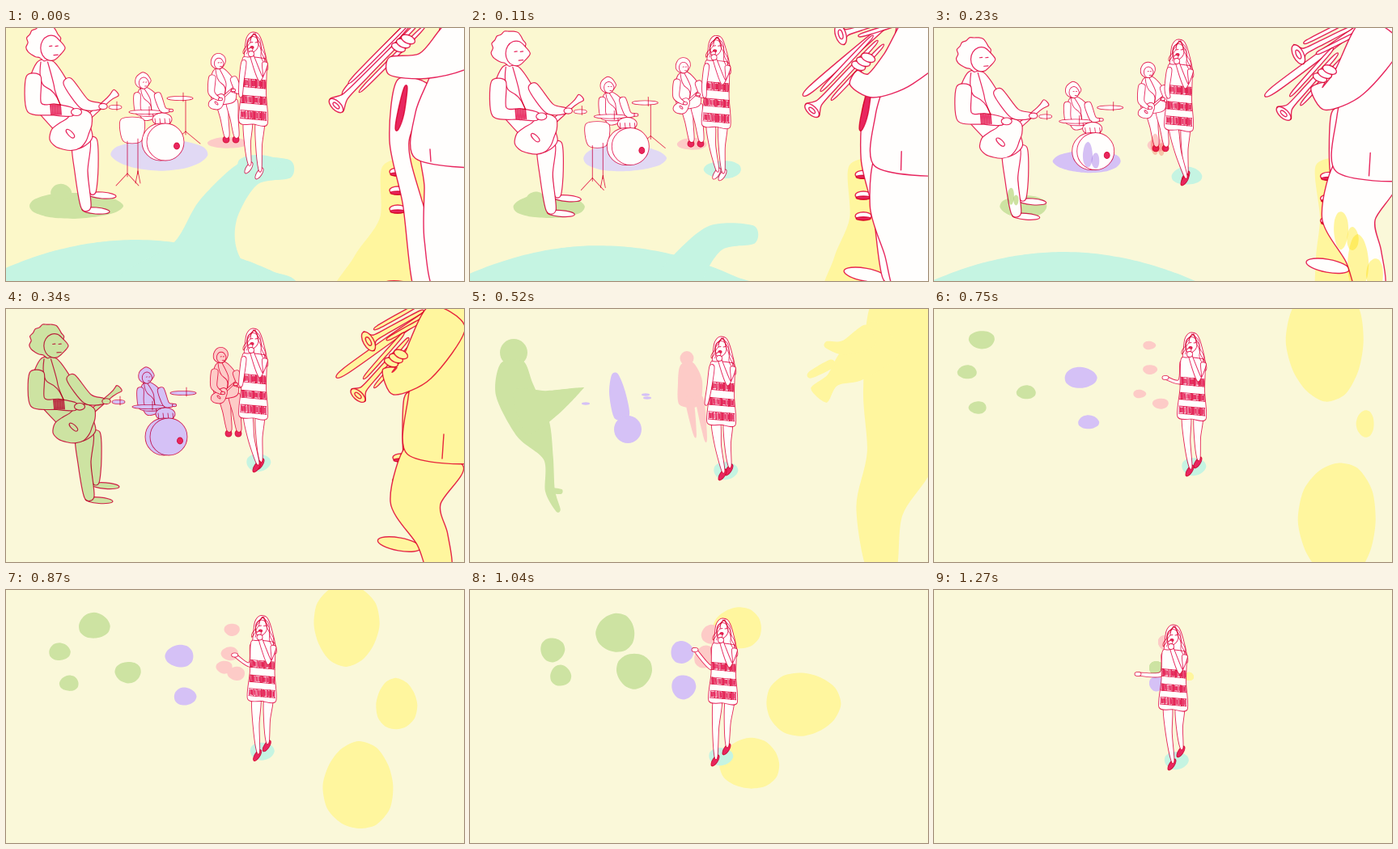
These frames come from a looping animation (566x313 px, 2.83 s). An HTML page with a canvas:

```html
<!DOCTYPE html>
<html lang="en">
<head>
<meta charset="utf-8">
<title>Band of colours</title>
<style>
html, body { margin: 0; width: 100%; height: 100%; overflow: hidden; background: #faf8d9; }
canvas { display: block; }
</style>
</head>
<body>
<canvas id="stage" width="566" height="313"></canvas>
<script>
const g = document.getElementById('stage').getContext('2d');
const LOOP = 2830;
const STEPS = [0, 50, 110, 230, 280, 340, 460, 520, 640, 700, 750, 870, 980, 1040, 1100, 1160, 1270];
const INK = '#e8265f', WHITE = '#fffefd';
const GREEN = '#cde3a2', PURPLE = '#d5c1f6', PINK = '#fdcbc7', YELLOW = '#fff69e', TEAL = '#c5f4e2';

const mix = (a, b, k) => a + (b - a) * k;
const mixPt = (p, q, k) => p.map((v, i) => mix(v, q[i], k));
const clamp = k => Math.max(0, Math.min(1, k));
const noise = i => { const v = Math.sin(i * 127.1 + 3.7) * 43758.5; return v - Math.floor(v); };
// Joints "x,y" or "x,y,half width".
const pts = s => s.split(' ').map(p => p.split(',').map(Number));

// Current fill and line weight; weight 0 draws plain colour.
let paint = WHITE, weight = 1;
function pen(color, w) { paint = color; weight = w; }

function ink(w = weight) {
  if (!w) return;
  g.globalCompositeOperation = 'multiply';
  g.strokeStyle = INK;
  g.lineWidth = w;
  g.stroke();
  g.globalCompositeOperation = 'source-over';
}
function fill(color = paint) {
  g.fillStyle = color;
  g.fill();
  ink();
}
function line(p, w = weight) {
  g.beginPath();
  p.forEach(([x, y], i) => {
    const [nx, ny] = p[i + 1] || [x, y];
    if (i && i < p.length - 1) g.quadraticCurveTo(x, y, (x + nx) / 2, (y + ny) / 2);
    else g.lineTo(x, y);
  });
  ink(w);
}
// Smooth closed outline.
function loop(p, color) {
  const n = p.length, at = i => p[(i + n) % n];
  g.beginPath();
  g.moveTo(p[0][0], p[0][1]);
  for (let i = 0; i < n; i++) {
    const [a, b, c, d] = [at(i - 1), at(i), at(i + 1), at(i + 2)];
    g.bezierCurveTo(b[0] + (c[0] - a[0]) / 7, b[1] + (c[1] - a[1]) / 7,
      c[0] - (d[0] - b[0]) / 7, c[1] - (d[1] - b[1]) / 7, c[0], c[1]);
  }
  g.closePath();
  fill(color);
}
function oval(x, y, rx, ry, color, tilt = 0) {
  g.beginPath();
  g.ellipse(x, y, rx, ry, tilt, 0, 7);
  fill(color);
}
// Closed shape whose radius is a function of the angle.
function polar(x, y, radius, n, squash = 1, tilt = 0, color) {
  const c = Math.cos(tilt), s = Math.sin(tilt);
  loop(Array.from({ length: n }, (_, i) => {
    const a = i / n * Math.PI * 2, r = radius(a, i), u = r * Math.cos(a), v = r * squash * Math.sin(a);
    return [x + u * c - v * s, y + u * s + v * c];
  }), color);
}
const blob = (x, y, rx, ry, color) => {
  if (rx < 0.5) return;
  pen(color, 0);
  polar(x, y, a => rx * (1 + 0.035 * Math.sin(a * 3 + rx)), 12, ry / rx);
};
// Tapered shape along joints.
function limb(joints, color) {
  const side = sign => joints.map(([x, y, w], i) => {
    const a = joints[Math.max(0, i - 1)], b = joints[Math.min(joints.length - 1, i + 1)];
    const d = Math.hypot(b[0] - a[0], b[1] - a[1]) || 1;
    return [x - (b[1] - a[1]) / d * w * sign, y + (b[0] - a[0]) / d * w * sign];
  });
  loop([...side(1), ...side(-1).reverse()], color);
}

function head(x, y, r, turn) {
  polar(x, y, (a, i) => r * (0.93 + 0.17 * noise(i + r)), r > 15 ? 24 : 12);
  const fx = x + r * 0.42 * turn, fy = y + r * 0.32;
  polar(fx, fy, (a, i) => r * (i ? 0.62 : 0.62 + 0.2 * turn), 10, 1.2);
  for (const e of [0.1, 0.45]) line([[fx + r * (e - 0.2), fy - r * 0.1], [fx + r * (e - 0.05), fy - r * 0.12]]);
  line([[fx + r * 0.15, fy + r * 0.42], [fx + r * 0.4, fy + r * 0.4]]);
}
function guitar([x, y], [tx, ty], r) {
  const a = Math.atan2(ty - y, tx - x);
  limb([[x, y, r * 0.12], [mix(x, tx, 0.82), mix(y, ty, 0.82), r * 0.1], [tx, ty, r * 0.18]]);
  polar(x, y, b => r * (1 + 0.14 * Math.cos(2 * b) + 0.12 * Math.cos(3 * b + 1)), 14, 0.86, a);
  oval(x - r * 0.1, y + r * 0.1, r * 0.26, r * 0.11, paint, 0.8);
}
function lapels([neck, chest, hip]) {
  for (const s of [-0.5, 0.35]) {
    line([[neck[0] + s * neck[2], neck[1]], [chest[0] + s * chest[2] * 0.9, chest[1] - chest[2] * 0.2],
      [chest[0] + chest[2] * 0.35, chest[1] + 4], [mix(chest[0], hip[0], 0.8), mix(chest[1], hip[1], 0.8)]]);
  }
}
function member({ face, torso, arms, legs = [], shoe, axe }) {
  for (const leg of legs) {
    const [x, y, w] = leg[leg.length - 1];
    oval(x + shoe.dx, y + shoe.ry, shoe.rx, shoe.ry, shoe.color, shoe.tilt);
    limb(leg);
  }
  limb(torso);
  lapels(torso);
  head(...face);
  if (axe) guitar(...axe);
  for (const arm of arms) {
    limb(arm);
    const [x, y, w] = arm[arm.length - 1];
    oval(x + w, y, w * 1.3, w * 0.9);
  }
}

const guitarist = {
  color: GREEN, move: [4, 22], squeeze: 0.95, top: 10, bottom: 245, width: 1.2,
  draw() {
    member({
      face: [47, 18, 21, 1],
      torso: pts('48,42,10 51,74,26 76,112,22 96,142,13'),
      legs: [pts('103,138,9 107,172,7 107,203,4'), pts('93,140,11 93,178,8 99,222,6')],
      shoe: { dx: 12, rx: 17, ry: 4, tilt: 0.08 },
      axe: [[82, 128], [136, 80], 26],
      arms: [pts('76,66,6 97,94,7 116,97,4'), pts('34,60,9 35,98,10 60,101,7 82,104,5')]
    });
    for (let i = 0; i < 7 && weight; i++) line([[55 + i * 2, 95], [56 + i * 2, 107]], 1.8);
  }
};
const drummer = {
  color: PURPLE, move: [4, 17], squeeze: 1, top: 60, bottom: 182, width: 0.9,
  draw(k) {
    member({
      face: [169, 65, 9.5, 0.3],
      torso: pts('169,75,5 174,89,14 182,110,12'),
      arms: [pts('162,82,4 164,104,4 182,107,2'), pts('187,82,4 194,101,4 202,102,2')]
    });
    oval(193, 113, 12, 8);
    for (let i = 0; i < 4; i++) line([[184 + i * 6, 112], [185 + i * 6, 120]]);
    if (k < 0.6) {
      limb(pts('156,113,14 156,140,11'));
      for (const [x, y, spread] of [[222, 88, 18], [163, 137, 3], [150, 140, 14]]) {
        line([[x, y], [x, y + 44]]);
        for (const s of [-spread, spread]) line([[x, y + 40], [x + s, y + 55]]);
      }
    }
    oval(191, 141, 23, 23);
    oval(197, 141, 23, 23);
    oval(211, 146, 3.5, 4, INK);
    for (const [x, y, r] of [[172, 104, 20], [215, 87, 16], [135, 98, 8]]) {
      oval(x, y, r, 2.6);
      line([[x + r / 4, y - 7], [x + r / 4, y + 4]]);
    }
  }
};
const bassist = {
  color: PINK, move: [3, 16], squeeze: 1, top: 40, bottom: 158, width: 0.9,
  draw() {
    member({
      face: [262, 41, 9, 0.25],
      torso: pts('262,51,6 267,68,15 270,92,13'),
      legs: [pts('267,90,7 270,112,5 273,134,3'), pts('279,90,7 282,112,5 285,134,3')],
      shoe: { dx: -1, rx: 4, ry: 4, color: INK, tilt: 0 },
      axe: [[261, 92], [289, 67], 10],
      arms: [pts('281,62,4 287,80,4 279,77,2'), pts('255,60,4 254,80,4 263,88,2')]
    });
  }
};

function horn([x0, y0], [x1, y1], size) {
  const at = k => [mix(x0, x1, k), mix(y0, y1, k)], tilt = Math.atan2(y1 - y0, x1 - x0);
  for (const off of [-1, 1]) limb([[...at(0), 2], [...at(0.7), 2]].map(([x, y, w]) => [x + off * size * 0.6, y + off * size * 0.5, w]));
  limb([[...at(0), 2], [...at(0.6), 3], [...at(0.88), 4], [...at(1), size]]);
  oval(x1, y1, size * 0.5, size, paint, tilt);
  oval(x1, y1, size * 0.2, size * 0.45, paint, tilt);
}
const brass = {
  color: YELLOW, top: 20, bottom: 313, width: 1.4, move: [0, 0], squeeze: 1,
  draw(time) {
    const k = 1 - (1 - time) ** 2;
    const at = (a, b) => pts(a).map((p, i) => mixPt(p, pts(b)[i], k));
    for (let i = 0; i < 3; i++) {
      const y = 178 + i * 23 + k * (6 + i * 5), x = mix(484, 488, k);
      oval(x, y, 10, 5);
      oval(x, y + 3, 9, 2, INK);
    }
    const back = at('505,70,22 486,140,12 502,215,12 528,325,22', '500,110,8 502,180,11 518,230,14 522,294,8');
    const [fx, fy] = back[3];
    oval(fx - 36, fy - 3, 27, 8, paint, 0.18);
    limb(back);
    if (time < 0.6) limb(pts('494,74,2 488,105,4 483,125,2'), INK);
    limb(at('570,140,52 566,200,49 564,260,47 574,325,40', '532,180,36 506,240,31 527,285,20 537,325,14'));
    limb(at('600,-30,50 575,60,48 557,115,52 552,166,46', '590,-30,55 566,60,56 548,120,52 542,184,46'));
    const [vent, end] = at('524,150 525,165', '541,155 539,185');
    line([vent, end], weight);
    const [a, b, c, d, e, f] = at('505,-2 408,96 530,-30 470,-30 500,-8 424,74', '494,40 435,107 512,4 448,40 520,5 419,77');
    limb([[...e, 3], [...f, 4]]);
    horn(c, d, 13);
    horn(a, b, 11);
    limb(at('620,-30,45 555,25,30 515,47,16 474,47,11', '545,10,26 508,72,22 478,92,14 474,74,9'));
    const [h] = at('485,24', '476,66');
    for (let i = 0; i < 3; i++) oval(h[0] + i * 6, h[1] - i * 5, 9, 5, paint, 0.4);
  }
};

// White at first, then colour climbs from the feet.
function show(who, t) {
  const k = clamp(t / 340), level = clamp((t - 230) / 110);
  const grad = g.createLinearGradient(0, who.bottom, 0, who.top);
  grad.addColorStop(level, who.color);
  grad.addColorStop(level, WHITE);
  pen(level === 0 ? WHITE : level === 1 ? who.color : grad, t < 460 ? who.width : 0);
  g.save();
  g.translate(who.move[0] * k, who.move[1] * k);
  g.scale(1, mix(1, who.squeeze, k));
  who.draw(k);
  g.restore();
}

// Colour on the floor, drawn up into the players.
function floor(t) {
  const k = clamp(t / 230), size = t <= 230 ? 1 : clamp((340 - t) / 110);
  const pool = (a, b, color) => {
    const [x, y, rx, ry] = mixPt(a, b, k);
    blob(x, y, rx * size, ry * size, color);
  };
  if (t < 340) {
    pen(TEAL, 0);
    const dome = x => mix(262, 277, k) + Math.max(0, t - 230) * 0.4 + 36 * ((x - 160) / 163) ** 2;
    const shore = Array.from({ length: 14 }, (_, i) => [i * 30 - 30, dome(i * 30 - 30)]);
    loop([...shore, [360, 380], [-30, 380]]);
    limb(pts('351,174,11 302,179,17 262,226,26 248,275,42 240,330,100').map(([x, y, w]) => [x, y + k * 170, w]));
    limb(pts('492,168,26 497,235,35 492,285,62 494,340,88').map(([x, y, w]) => [x, y, mix(w, 20, k) * size]), YELLOW);
  }
  pool([85, 220, 58, 16], [111, 221, 29, 14], GREEN);
  pool([68, 203, 13, 10], [95, 222, 10, 9], GREEN);
  pool([190, 157, 60, 19], [190, 165, 42, 14], k < 1 ? '#e1d9f4' : PURPLE);
  pool([274, 142, 25, 7], [275, 145, 11, 8], PINK);
}
function drips() {
  g.globalCompositeOperation = 'multiply';
  for (const [x, y, r, color] of [[95, 208, 4, GREEN], [190, 157, 6, PURPLE], [273, 144, 5, PINK], [503, 250, 9, YELLOW], [524, 290, 13, YELLOW]]) {
    blob(x, y, r, r * 2.6, color);
    blob(x + r * 1.6, y + r * 1.2, r * 0.8, r * 1.6, color);
  }
  g.globalCompositeOperation = 'source-over';
}

function silhouettes() {
  pen(GREEN, 0);
  oval(54, 54, 17, 17);
  limb(pts('52,66,14 55,100,24 78,148,22 97,185,6 99,225,6 109,249,3'));
  limb(pts('62,128,28 100,117,17 137,99,2'));
  limb(pts('98,224,3 113,226,3'));
  pen(PURPLE, 0);
  limb(pts('179,81,4 182,104,10 188,134,9'));
  oval(195, 149, 17, 17);
  for (const [x, y] of [[143, 117], [217, 106], [219, 110]]) oval(x, y, 5, 1.7);
  pen(PINK, 0);
  oval(268, 61, 8.5, 9);
  limb(pts('268,68,8 272,90,15 271,119,12'));
  for (const x of [271, 284]) limb([[x, 112, 5], [x + 7, x - 124 + (x < 280 ? 8 : 0), 2]]);
  pen(YELLOW, 0);
  limb(pts('545,-10,45 535,100,49 532,185,42 506,250,29 509,325,17'));
  limb(pts('515,35,25 472,70,22 448,88,9 431,107,13'));
  limb(pts('495,32,14 462,48,9 440,44,4'));
  limb(pts('448,67,5 420,82,4'));
}

// Each drop: place and radius at 750, then at 1040; home is where the colour gathers.
const DROPS = [
  { color: YELLOW, home: [315, 107, 6], flat: [1.52, 0.85], list: ['484,40,48 331,47,30', '533,142,11 411,141,46', '499,262,48 346,215,37'] },
  { color: GREEN, home: [275, 97, 9], flat: [0.7, 1], list: ['59,38,16 180,53,24', '41,78,12 102,74,15', '114,103,12 203,100,22', '54,122,11 112,106,13'] },
  { color: PINK, home: [286, 65, 9], flat: [0.65, 1], list: ['266,45,8 298,55,12', '267,75,9 290,84,13', '254,105,8 292,82,13', '280,117,10 291,84,12'] },
  { color: PURPLE, home: [275, 116, 9], flat: [0.65, 1], list: ['181,85,20 262,77,14', '191,140,13 264,120,15'] }
];
function scatter(t) {
  const k = clamp((t - 750) / 290), gather = clamp((t - 1040) / 125);
  const swell = 1 + clamp((750 - t) / 110) * 0.4;
  for (const { color, home, flat, list } of DROPS) for (const drop of list) {
    const [a, b] = pts(drop), [x, y, r] = mixPt(mixPt(a, b, k), home, gather);
    blob(x, y, r * swell, r * swell * mix(flat[0], flat[1], k), color);
  }
}

// Singer keys: head, left foot, right foot, free hand.
const SING = [0, 230, 340, 520, 750, 1040, 1270];
const KEYS = [
  '306,19 300,173 313,180 290,84', '303,28 310,188 311,184 290,86', '306,38 310,195 314,192 290,95',
  '311,48 312,205 320,199 292,117', '319,43 316,200 326,190 286,85', '313,49 303,211 317,197 278,74',
  '296,57 294,216 305,200 252,104'].map(pts);

function singer(t) {
  const i = Math.max(0, SING.findLastIndex(s => s <= t)), j = Math.min(i + 1, 6);
  const k = j > i ? (t - SING[i]) / (SING[j] - SING[i]) : 0;
  const [h, left, right, hand] = KEYS[i].map((p, n) => mixPt(p, KEYS[j][n], k));
  const off = (x, y) => [h[0] + x, h[1] + y];
  const drop = mix(97, 88, clamp(t / 1000)), small = clamp(t / 340);
  blob((left[0] + right[0]) / 2 + mix(6, 0, small), left[1] - 5, mix(27, 15, small), 11, TEAL);
  pen(WHITE, 0.9);

  for (const [[x, y], hip] of [[right, 8], [left, -7]]) {
    oval(x, y, 8, 3.2, t < 200 ? WHITE : INK, -1);
    const [hx, hy] = off(hip, drop);
    limb([[hx, hy, 5.5], [mix(hx, x, 0.45) - 1, mix(hy, y, 0.45), 4], [x + 1, y - 5, 2]]);
  }
  // hair
  limb([[...off(1, -13), 4], [...off(0, -6), 9], [...off(1, 8), 12], [...off(2, 22), 14], [...off(5, 36), 12]]);
  const arm = () => limb([[...off(-12, 23), 3], [...off(-15, 47), 3], [...hand, 2]]);
  if (t > 600) {
    arm();
    oval(...hand, 4, 2.6);
  }
  // dress
  const edge = (u, v) => off(mix(mix(-14, -18, v), mix(16, 17, v), u), mix(20, drop, v) + u * 3);
  loop([off(-7, 17), edge(0, 0), edge(0.03, 0.5), edge(0, 1), edge(0.5, 1.02), edge(1, 1), edge(0.97, 0.5), edge(1, 0), off(9, 18)]);
  for (const [a, b] of [[0.3, 0.43], [0.57, 0.69], [0.81, 0.94]]) {
    for (let n = 0; n < 24; n++) {
      const u = mix(0.05, 0.95, n / 23), r = noise(n + a * 50) * 0.03;
      line([edge(u, a + r), edge(u, b - r)], noise(n) * 0.7 + 0.9);
    }
    for (const v of [a, b]) line([edge(0.03, v), edge(0.97, v)]);
  }
  if (t <= 600) arm();
  // face under wavy strands
  polar(...off(-1, 1), (a, n) => 7 + (n === 3 ? 1 : 0), 12, 1.35, 0.1);
  for (let n = 0; n < 6; n++) {
    const s = n % 2 ? 1 : -1, reach = 7 + (n >> 1) * 2;
    line(Array.from({ length: 9 }, (_, m) => off(1 + s * (reach * Math.sqrt(m / 8) + Math.sin(m * 1.5 + n) * 1.3 + m * 0.4), m * (3.7 + s * 0.6) - 12)), 0.8);
  }
  for (const x of [-4, 2]) line([off(x, -1), off(x + 3, -1.5)], 0.9);
  oval(...off(-2, 5), 2.2, 1.5, INK);
  // microphone
  limb([[...off(14, 25), 3.5], [...off(9, 44), 3.5], [...off(-3, 13), 2]]);
  oval(...off(-4, 8), 3, 2.3, paint, -0.3);
  oval(...off(-3, 13), 3.5, 3.5);
}

function draw(t) {
  const k = clamp(t / 230);
  g.fillStyle = `rgb(${mix(252, 250, k)},${mix(248, 248, k)},${mix(201, 217, k)})`;
  g.fillRect(0, 0, 566, 313);
  if (t < 520) {
    floor(t);
    for (const who of [guitarist, drummer, bassist]) show(who, t);
  } else if (t < 640) silhouettes();
  else scatter(t);
  singer(t);
  if (t < 520) show(brass, t);
  if (t >= 200 && t < 280) drips();
}

g.lineJoin = g.lineCap = 'round';
let shown = -1;
function tick() {
  const now = performance.now() % LOOP;
  const t = STEPS.filter(s => s <= now).pop();
  if (t !== shown) draw(shown = t);
  requestAnimationFrame(tick);
}
tick();
</script>
</body>
</html>
```
